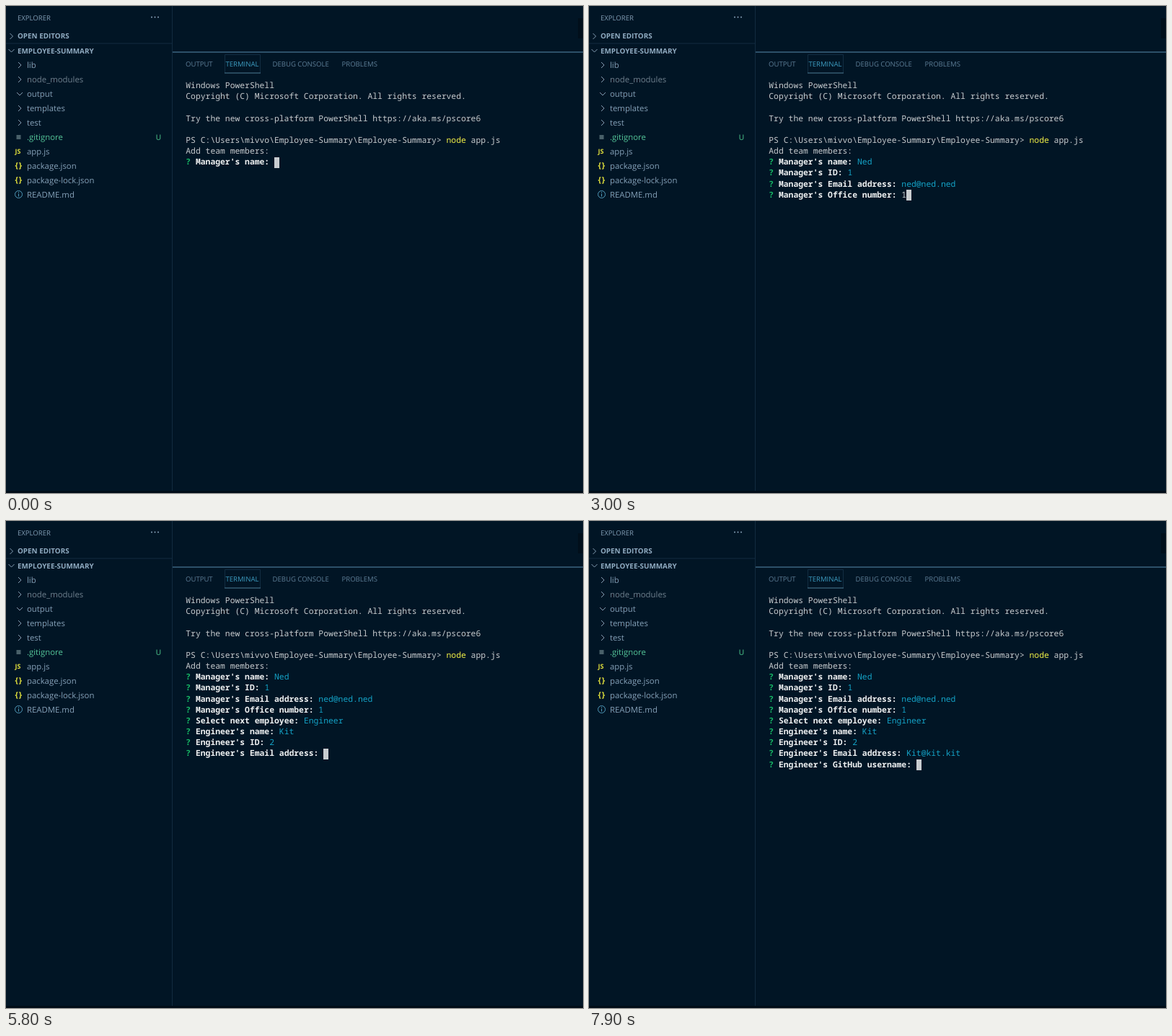
Recreate the animation shown at these times as an HTML page. Size 800x676 px, loop 8 s.

```html
<!DOCTYPE html>
<html lang="en">
<head>
<meta charset="utf-8">
<title>Terminal prompt</title>
<style>
  html, body { margin: 0; width: 100%; height: 100%; overflow: hidden; background: #011525; }
  svg { position: absolute; left: 0; top: 0; }
  svg, pre { text-rendering: geometricPrecision; }
  text { font: 9.55px "Open Sans", "Noto Sans", sans-serif; fill: #5f7e97; }
  .head { font-size: 9.9px; font-weight: 700; fill: #91abc1; }
  .file { font-size: 11.35px; fill: #86a1b8; }
  .icon { font-size: 9px; font-weight: 700; fill: #dcdc3c; }
  .json { font-size: 11px; letter-spacing: 1px; }
  .line { fill: none; stroke: #86a0b5; }
  pre {
    position: absolute; left: 249.3px; top: 103.2px; margin: 0;
    font: 500 11.37px/15.16px "Noto Sans Mono", "DejaVu Sans Mono", monospace;
    color: #c8cbce;
  }
  pre b { color: #f0f1f2; }
  .ask { color: #16b564; font-weight: 700; }
  .answer { color: #14a2c6; }
  .cmd { color: #f0f046; }
  #cursor { position: absolute; width: 1ch; height: 15px; background: #c8ccd0; }
</style>
</head>
<body>
<svg width="800" height="676">
  <rect x="793" y="17" width="28" height="28" fill="#010f1b"/>
  <rect y="673" width="800" height="3" fill="#010c17"/>
  <path d="M230.5 0V673M0 52H230" stroke="#122b40" fill="none"/>
  <path d="M231 64H800" stroke="#3c6580" stroke-width="1.5"/>
  <path d="M303.5 93V67.5H352.5V93" stroke="#122d42" fill="none"/>
  <path d="M303 93H353" stroke="#4f7c94"/>
  <g fill="#89a4bb"><circle cx="202" cy="15.5" r="1"/><circle cx="206.5" cy="15.5" r="1"/><circle cx="211" cy="15.5" r="1"/></g>
  <text x="16" y="19.5" style="fill:#829db4">EXPLORER</text>
  <text x="16" y="45" class="head">OPEN EDITORS</text>
  <text x="16" y="65.5" class="head">EMPLOYEE-SUMMARY</text>
  <text x="249" y="84">OUTPUT</text>
  <text x="304.5" y="84" style="fill:#3f9fc4">TERMINAL</text>
  <text x="369.5" y="84">DEBUG CONSOLE</text>
  <text x="465.5" y="84">PROBLEMS</text>
  <text x="207.5" y="186" style="font-size:10.5px;font-weight:600;fill:#3a9a72">U</text>
  <rect x="14.5" y="179" width="6" height="6" fill="#496069"/>
  <g id="tree"></g>
  <g fill="none" stroke="#519aba"><circle cx="17.5" cy="261.5" r="5"/><path d="M17.5 260.5V264.5M17.5 258V259.3"/></g>
</svg>
<pre><span id="term"></span><i id="cursor"></i></pre>
<script>
const LOOP = 8000;
const byId = id => document.getElementById(id);
const span = (cls, text) => `<span class="${cls}">${text}</span>`;

// Explorer tree
const chevron = (x, y, open) =>
  `<path class="line" d="${open ? `M${x - 4} ${y - 2}l4 4 4-4` : `M${x - 2} ${y - 4}l4 4-4 4`}"/>`;
const icon = (text, cls = "") => y => `<text class="icon ${cls}" x="12.5" y="${y + 3}">${text}</text>`;
const folder = open => y => chevron(19, y, open);
const files = [
  ["lib", folder()],
  ["node_modules", folder(), "#70808e"],
  ["output", folder(true)],
  ["templates", folder()],
  ["test", folder()],
  [".gitignore", () => "", "#55c69a"],
  ["app.js", icon("JS")],
  ["package.json", icon("{}", "json")],
  ["package-lock.json", icon("{}", "json")],
  ["README.md", () => ""]
];
byId("tree").innerHTML = chevron(7.5, 42) + chevron(7.5, 62, true) +
  files.map(([name, mark, color = "#86a1b8"], i) => {
    const y = 82 + 20 * i;
    return `${mark(y)}<text class="file" x="29" y="${y + 4}" style="fill:${color}">${name}</text>`;
  }).join("");

// Terminal session: label, answer, first key, ms per key, enter
const intro = [
  "Windows PowerShell",
  "Copyright (C) Microsoft Corporation. All rights reserved.",
  "",
  "Try the new cross-platform PowerShell https://aka.ms/pscore6",
  "",
  `PS C:\\Users\\mivvo\\Employee-Summary\\Employee-Summary&gt; ${span("cmd", "node")} app.js`,
  "Add team members:"
];
const prompts = [
  ["Manager's name:", "Ned", 300, 100, 700],
  ["Manager's ID:", "1", 900, 100, 1300],
  ["Manager's Email address:", "ned@ned.ned", 1550, 70, 2700],
  ["Manager's Office number:", "1", 3000, 100, 3300],
  ["Select next employee:", "Engineer", 0, 0, 4200],
  ["Engineer's name:", "Kit", 4700, 150, 5300],
  ["Engineer's ID:", "2", 5600, 100, 5800],
  ["Engineer's Email address:", "Kit@kit.kit", 6000, 100, 7400],
  ["Engineer's GitHub username:", "", LOOP, 100, LOOP]
];
const menu = [span("answer", "&gt; Engineer"), "  Intern", "  None"];
const hint = "(Use arrow keys)";

function render(t) {
  const rows = [...intro];
  let col = 0;
  for (const [label, answer, start, step, enter] of prompts) {
    const done = t >= enter;
    const choosing = !step && !done;
    const keys = Math.max(0, Math.floor((t - start) / step) + 1);
    const value = choosing ? hint : done ? answer : answer.slice(0, keys);
    rows.push(`${span("ask", "?")} <b>${label}</b> ${done ? span("answer", value) : value}`);
    if (choosing) rows.push(...menu);
    col = label.length + 3 + value.length;
    if (!done) break;
  }
  byId("term").innerHTML = rows.join("\n");
  byId("cursor").style.cssText = `left:${col}ch;top:${(rows.length - 1) * 15.16 + 0.3}px`;
}

function frame() {
  render(performance.now() % LOOP);
  requestAnimationFrame(frame);
}
frame();
</script>
</body>
</html>
```
